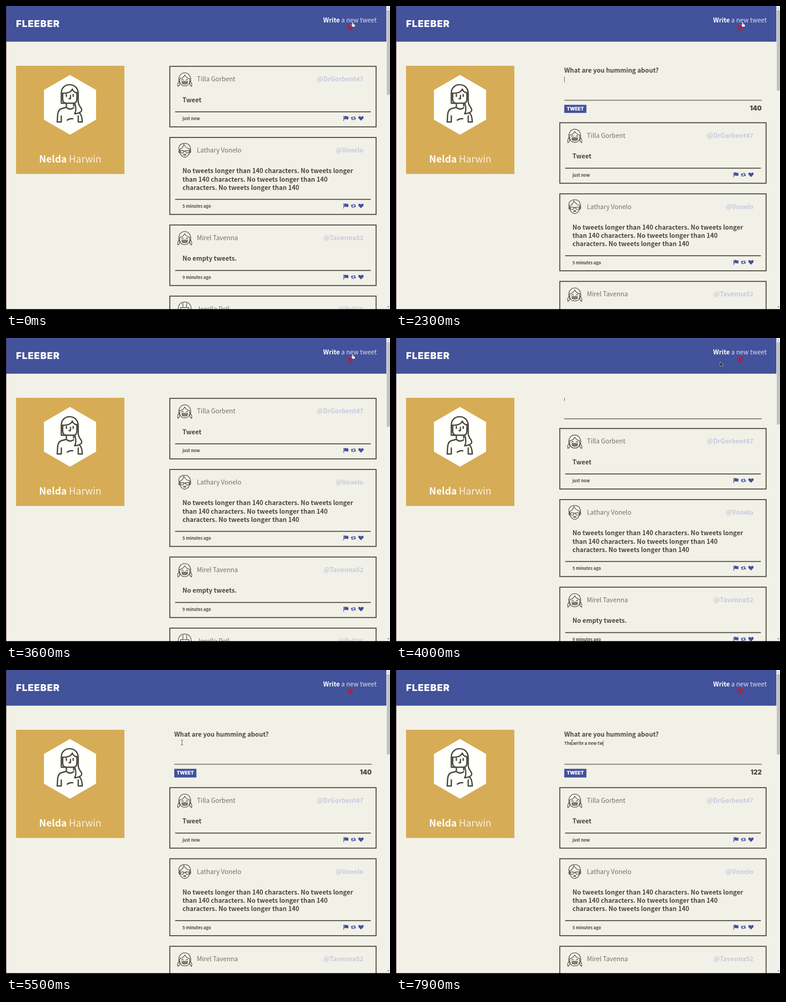
Write an HTML page with a canvas that moves like this. It is 840 px wide and 666 px high and loops after 8000 ms.

```html
<!DOCTYPE html>
<html lang="en">
<head>
<meta charset="utf-8">
<title>Short message feed</title>
<style>
html, body { margin: 0; width: 100%; height: 100%; overflow: hidden; background: #f2f1e8; }
canvas { display: block; }
</style>
</head>
<body>
<canvas id="stage" width="840" height="666"></canvas>
<script>
const ctx = document.getElementById('stage').getContext('2d');
const SANS = '"Noto Sans CJK JP","Noto Sans CJK SC","Noto Sans CJK","Open Sans",sans-serif';
const CHUNKY = 'Inter,"Lato",sans-serif';
const PAPER = '#f2f1e8', INK = '#4b493d', BLUE = '#42529b', PALE = '#c6c9dd', GOLD = '#d7ac56';
// Softer tones for thin lettering
const THIN_INK = '#737167', THIN_WHITE = 'rgba(255,255,255,.82)';
const LOOP = 8000, FRAME = 100;

// Form geometry and timing
const FORM_TOP = 131, FORM_HEIGHT = 105, FORM_SPACE = 125.5, FOCUS_SCROLL = 29.5;
const SLIDE = 600, OPEN_1 = 811, CLOSE_1 = 2252, OPEN_2 = 3690;
const BLINK = 600;

const MESSAGE = 'The write a new tw';
const KEY_TIMES = [5700, 5900, 6000, 6100, 6200, 6400, 6600,
  ...Array.from({ length: 9 }, (_, i) => 6800 + i * 100), 7700, 7900];

const FACES = {
  girl: `M-13 5C-16-20 16-20 13 5M-11-1Q-3-2 0-9Q4-2 11-1M-11-1V6Q-9 15 0 15Q9 15 11 6V-1
    M-12 5Q-17 9-15 16Q-9 13-12 5M12 5Q17 9 15 16Q9 13 12 5
    M-7 2Q-5-1-3 2M3 2Q5-1 7 2M-6 5H6V7Q6 11 0 11Q-6 11-6 7ZM-6 8H6M-3 5V10M0 5V11M3 5V10`,
  man: `M-12 1Q-16-12-3-15Q13-17 13 1M-11-2Q-4-4-2-13Q3-4 11-3M-11-2V5Q-8 13-2 15H2Q8 13 11 5V-3
    M-10 1H-2V3Q-2 6-6 6Q-10 6-10 3ZM2 1H10V3Q10 6 6 6Q2 6 2 3ZM-2 2H2
    M-12 1Q-15 3-11 6M12 1Q15 3 11 6M-3 10Q0 8 3 10Q0 12-3 10Z`,
  bob: `M-14 14V-1C-14-20 14-20 14-1V14M-9 14V-3H9V14M-4-3V-13M4-3V-13`
};
const PORTRAIT = new Path2D(`M130 213H121V191C121 166 158 166 158 192V208Q158 216 164 223Q168 230 162 233
  Q156 236 150 236Q155 229 151 215M122 191Q141 192 145 182Q148 190 156 190
  M124 191V205Q125 213 132 213H147Q155 213 155 204V191M132 194V198M147 194V198M141 196V203H138
  M132 214V222L121 225Q114 227 113 238L112 254H121V241M148 214V219M132 222Q139 229 148 223
  M161 235Q166 238 167 254H158V241M134 250Q140 246 146 247`);
const ICONS = {
  flag: new Path2D('M0-5H1.3V6H0ZM2-4Q5-6 7-4Q9-3 11-4.5V2Q9 3.5 7 2.5Q5 1 2 3Z'),
  repeat: new Path2D('M3-3.5L6 0H3.8V2H7L8.2 3.5H2.2V0H0ZM9.5 3.5L12.5 0H10.3V-3.5H4.3L5.5-2H8.7V0H6.5Z'),
  heart: new Path2D('M5.8 5L.8 0C-2-4 3-7 5.8-3C8.6-7 13.6-4 10.8 0Z')
};
const POINTER = new Path2D('M0 0V8.5L2 6.8L3.4 9.6L4.8 9L3.5 6.3H6Z');
const HAND = new Path2D('M2.4 10L0 6Q.8 4.6 2 6V1Q3-.4 4 1V4.3L7.4 5.2Q8 6 7.7 8L7 10Z');
const IBEAM = new Path2D('M-2-5H2M0-5V5M-2 5H2');

const POSTS = [
  { name: 'Tilla Gorbent', handle: '@DrGorbent47', face: 'girl', age: 'just now', lines: ['Tweet'] },
  { name: 'Lathary Vonelo', handle: '@Vonelo', face: 'man', age: '5 minutes ago', lines: [
    'No tweets longer than 140 characters. No tweets longer',
    'than 140 characters. No tweets longer than 140',
    'characters. No tweets longer than 140'] },
  { name: 'Mirel Tavenna', handle: '@Tavenna52', face: 'girl', age: '9 minutes ago', lines: ['No empty tweets.'] },
  { name: 'Jorella Pell', handle: '@Pell26', face: 'bob', age: '12 minutes ago', lines: ['Hello.'] }
];

const clamp = x => Math.max(0, Math.min(1, x));
const mix = (a, b, k) => a + (b - a) * k;
const swing = x => 0.5 - Math.cos(Math.PI * clamp(x)) / 2;

// CSS "ease": cubic-bezier(.25, .1, .25, 1)
function ease(x) {
  let lo = 0, hi = 1;
  for (let i = 0; i < 20; i++) {
    const u = (lo + hi) / 2;
    if (0.75 * u * (1 - u) + u * u * u < x) lo = u; else hi = u;
  }
  return 0.3 * lo * (1 - lo) ** 2 + 3 * lo * lo * (1 - lo) + lo ** 3;
}

function rect(x, y, w, h, color) {
  ctx.fillStyle = color;
  ctx.fillRect(x, y, w, h);
}

function text(str, x, y, size, weight, color, { align = 'left', family = SANS, spacing = 0 } = {}) {
  ctx.font = `${weight} ${size}px ${family}`;
  ctx.letterSpacing = spacing + 'px';
  ctx.textAlign = align;
  ctx.fillStyle = color;
  ctx.fillText(str, x, y);
  return ctx.measureText(str).width;
}

function shape(path, x, y, { fill, stroke, width = 1 }) {
  ctx.save();
  ctx.translate(x, y);
  ctx.lineWidth = width;
  ctx.lineCap = ctx.lineJoin = 'round';
  if (stroke) { ctx.strokeStyle = stroke; ctx.stroke(path); }
  if (fill) { ctx.fillStyle = fill; ctx.fill(path); }
  ctx.restore();
}

function bounce(t) {
  const p = ((t + LOOP - 600) % 2000) / 2000;
  const keys = [[0, 0], [0.2, 0], [0.4, -6], [0.5, 0], [0.6, -3], [0.8, 0], [1, 0]];
  const i = keys.findIndex(k => p < k[0]);
  const [p0, y0] = keys[i - 1], [p1, y1] = keys[i];
  return mix(y0, y1, ease((p - p0) / (p1 - p0)));
}

function drawHeader(t) {
  rect(0, 0, 832, 78.2, BLUE);
  text('FLEEBER', 22, 46, 20.6, 900, '#fff', { family: CHUNKY, spacing: 1 });
  const rest = text(' a new tweet', 811, 35.5, 13.8, 300, THIN_WHITE, { align: 'right' });
  text('Write', 811 - rest, 35.5, 13.8, 700, '#fff', { align: 'right' });
  const chevrons = new Path2D('M-5 0L0 5L5 0M-5 6L0 11L5 6');
  shape(chevrons, 752.7, 42 + bounce(t), { stroke: '#d90f1c', width: 2.2 });
}

function drawProfile() {
  rect(22, 131, 237, 237, GOLD);
  let seed = 17;
  const random = () => (seed = seed * 16807 % 2147483647) / 2147483647;
  for (let i = 0; i < 420; i++) {
    const size = 0.5 + random() * 0.9;
    rect(22 + random() * 235, 131 + random() * 235, size, size,
      i % 3 ? 'rgba(240,211,145,.45)' : 'rgba(190,140,50,.3)');
  }
  shape(new Path2D('M140 151L197 184V249L140 282L83 249V184Z'), 0, 0, { fill: '#fffffc' });
  shape(PORTRAIT, 0, 0, { stroke: INK, width: 2.9 });

  const first = 'Nelda', last = ' Harwin', size = 21;
  const widthOf = (str, weight) => {
    ctx.font = `${weight} ${size}px ${SANS}`;
    ctx.letterSpacing = '0px';
    return ctx.measureText(str).width;
  };
  const start = 140.5 - (widthOf(first, 700) + widthOf(last, 300)) / 2;
  const used = text(first, start, 343, size, 700, '#fff');
  text(last, start + used, 343, size, 300, THIN_WHITE);
}

function drawPost(post, top) {
  const height = 134.6 + (post.lines.length - 1) * 18, bottom = top + height;
  ctx.strokeStyle = INK;
  ctx.lineWidth = 2.1;
  ctx.strokeRect(358.3, top + 1, 451.3, height - 2);
  shape(new Path2D(FACES[post.face]), 391, top + 29, { stroke: INK, width: 1.3 });
  text(post.name, 417.5, top + 34, 13.9, 300, THIN_INK);
  text(post.handle, 782, top + 34, 13.8, 700, PALE, { align: 'right' });
  post.lines.forEach((line, i) => text(line, 386, top + 79.4 + i * 18.2, 13.75, 700, INK));
  rect(370, bottom - 35, 428, 2, INK);
  text(post.age, 386, bottom - 15.6, 9.1, 700, INK);
  shape(ICONS.flag, 738, bottom - 20, { fill: BLUE });
  shape(ICONS.repeat, 753.7, bottom - 19.7, { fill: BLUE });
  shape(ICONS.heart, 770.7, bottom - 19.5, { fill: BLUE });
  return bottom + 21.2;
}

function formState(t) {
  if (t >= OPEN_2) return { open: swing((t - OPEN_2) / SLIDE), focus: OPEN_2, opening: true };
  if (t >= CLOSE_1) return { open: 1 - swing((t - CLOSE_1) / SLIDE), focus: CLOSE_1, opening: false };
  return { open: swing((t - OPEN_1) / SLIDE), focus: OPEN_1, opening: true };
}

function drawForm(t, { open, focus, opening }) {
  if (open <= 0) return;
  const typed = KEY_TIMES.filter(k => k <= t).length;
  const lastActive = typed ? KEY_TIMES[typed - 1] : focus;
  const scroll = opening ? Math.min(FOCUS_SCROLL, FORM_HEIGHT * (1 - open)) : 0;

  ctx.save();
  ctx.beginPath();
  ctx.rect(357, FORM_TOP, 454, FORM_HEIGHT * open);
  ctx.clip();
  ctx.translate(0, -scroll);
  text('What are you humming about?', 368, 145.5, 13.75, 700, INK);
  const width = text(MESSAGE.slice(0, typed), 368, 164.2, 9.15, 700, INK);
  if ((t - lastActive) % (2 * BLINK) < BLINK) rect(368 + width, 154.5, 0.9, 13, INK);
  rect(368, 205.6, 432, 1.8, '#706e65');
  rect(368, 216.5, 48.5, 19, BLUE);
  text('TWEET', 392.2, 229.3, 10.2, 900, '#fff', { align: 'center', family: CHUNKY });
  text(140 - typed, 800, 229, 14, 900, INK, { align: 'right', family: CHUNKY });
  ctx.restore();
}

function drawCursor(t) {
  if (t < 3900) {
    shape(HAND, 755.5, 35.5, { fill: '#fff', stroke: '#27305f', width: 1 });
  } else if (t < 4400) {
    const k = swing((t - 3900) / 400);
    shape(POINTER, mix(757, 430.5, k), mix(36, 151, k), { fill: '#222', stroke: '#fff', width: 1 });
  } else {
    const x = t < 4900 ? mix(431, 388.5, clamp((t - 4300) / 300)) : 385;
    shape(IBEAM, x, t < 4900 ? 157 : 158.8, { stroke: '#444', width: 0.9 });
  }
}

function drawScrollbar(open) {
  rect(832, 0, 8, 664, '#f1f1f1');
  rect(833, 9, 7, 185.5 - 9.5 * open, '#c1c1c1');
  shape(new Path2D('M-2 1.5L0-1L2 1.5Z'), 836.5, 4, { fill: '#999' });
  shape(new Path2D('M-2-1L0 1.5L2-1Z'), 836.5, 659, { fill: '#555' });
}

function draw(t) {
  const form = formState(t);
  rect(0, 0, 840, 666, PAPER);
  drawHeader(t);
  drawProfile();
  POSTS.reduce((top, post) => drawPost(post, top), 131.2 + FORM_SPACE * form.open);
  drawForm(t, form);
  drawScrollbar(form.open);
  rect(0, 0, 0.8, 664, '#4b2447');
  rect(0, 664, 840, 2, '#0c080c');
  drawCursor(t);
}

let start;
function tick(now) {
  start ??= now;
  const t = (now - start) % LOOP;
  draw(Math.floor(t / FRAME) * FRAME);
  requestAnimationFrame(tick);
}
requestAnimationFrame(tick);
</script>
</body>
</html>
```
